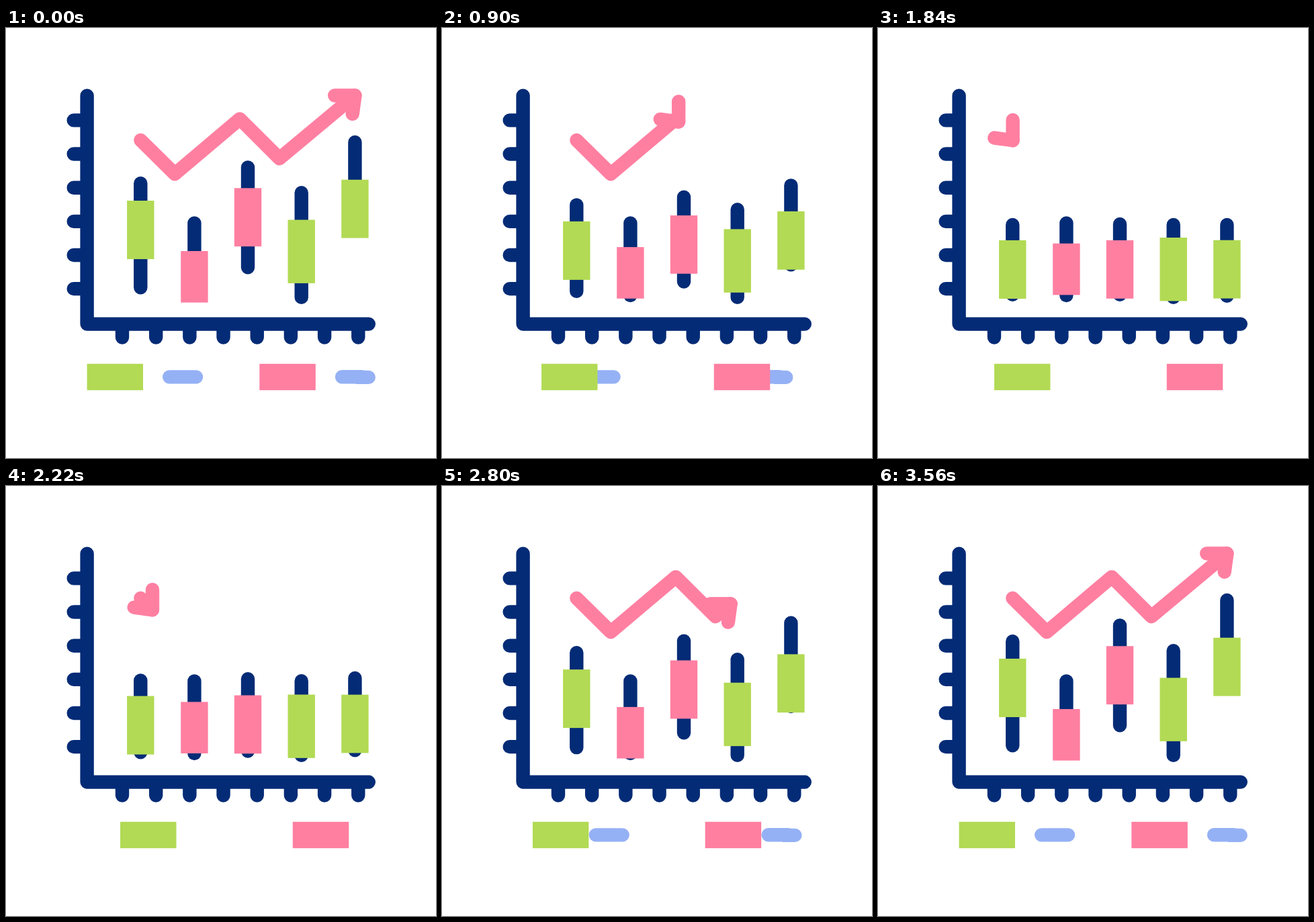
Animation of 640x640 px, one loop 3.6 s. Source, as an HTML page:

```html
<!DOCTYPE html>
<html lang="en">
<head>
<meta charset="utf-8">
<title>Candlestick chart</title>
<style>
  html, body { margin: 0; width: 100%; height: 100%; overflow: hidden; background: #fff; }
  svg { display: block; width: 100vw; height: 100vh; }
</style>
</head>
<body>
<svg id="stage" viewBox="0 0 640 640" fill="none" stroke-width="20.4" stroke-linecap="round" stroke-linejoin="round"></svg>
<script>
const NAVY = '#042b76', PINK = '#ff7fa1', GREEN = '#b2da54', BLUE = '#95b1f5';
const LOOP = 3600, HALF = 1779, SLIDE = 52.5;
const stage = document.getElementById('stage');

function add(tag, attrs, parent = stage) {
  const el = document.createElementNS('http://www.w3.org/2000/svg', tag);
  set(el, attrs);
  parent.append(el);
  return el;
}
function set(el, attrs) {
  for (const k in attrs) el.setAttribute(k, attrs[k]);
}
const stroke = (color, d, parent) => add('path', { d, stroke: color }, parent);
const box = (fill, x, y, width, height, parent) => add('rect', { fill, x, y, width, height }, parent);
const mix = ([a, b], p) => a + (b - a) * p;

// Axes and ticks
let axes = 'M120.6 100.6V440.6H539.8';
for (let i = 0; i < 6; i++) axes += `M100.7 ${137.4 + i * 50.15}h18`;
for (let i = 0; i < 8; i++) axes += `M${173 + i * 50.18} 442V460.6`;
stroke(NAVY, axes);

// Each pair is [expanded, collapsed]; wick values are the centres of its round ends
const candles = [
  { x: 200.3, color: GREEN, h: 87, top: [257, 316], wick: [[231.3, 293], [386.3, 396.8]] },
  { x: 280.4, color: PINK, h: 76.6, top: [332, 320.7], wick: [[290.4, 290.4], [398, 398]] },
  { x: 360, color: PINK, h: 86.8, top: [238.3, 316], wick: [[207.5, 292], [356.3, 396.8]] },
  { x: 439.7, color: GREEN, h: 94.4, top: [285.5, 312], wick: [[245.2, 293], [400.9, 400.9]] },
  { x: 519.4, color: GREEN, h: 86.8, top: [225.8, 315.8], wick: [[170, 293], [301.5, 398.8]] }
];
for (const c of candles) {
  c.line = stroke(NAVY, '');
  c.body = box(c.color, c.x - 20.2, 0, 40.4, c.h);
}

// Legend: swatches slide right while the pills slide left behind them
const pills = add('g', {});
stroke(BLUE, 'M243.2 519.4H283', pills);
stroke(BLUE, 'M500 519.3H530M522 519.9H539.7', pills);
const swatches = add('g', {});
box(GREEN, 120.6, 499.8, 83.4, 39.3, swatches);
box(PINK, 377.3, 499.8, 83.5, 39.3, swatches);

// Trend arrow
const route = [[200.4, 167], [251.2, 217.2], [348, 135.4], [407, 194.2], [519.4, 100.5]];
const dist = (a, b) => Math.hypot(b[0] - a[0], b[1] - a[1]);
const total = route.slice(1).reduce((sum, pt, i) => sum + dist(route[i], pt), 0);
const trend = stroke(PINK, '');
const head = stroke(PINK, 'M-30.2 0H0L-3.7 27.4');

function drawArrow(p) {
  let left = total * (1 - p), i = 0;
  while (i < 3 && left > dist(route[i], route[i + 1])) {
    left -= dist(route[i], route[i + 1]);
    i++;
  }
  const k = left / dist(route[i], route[i + 1]);
  const tip = [0, 1].map(n => mix([route[i][n], route[i + 1][n]], k));
  set(trend, { d: 'M' + [...route.slice(0, i + 1), tip].map(q => q.join(' ')).join('L') });
  // Falling segments turn the head by a quarter
  set(head, { transform: `translate(${tip}) rotate(${i % 2 ? 0 : 90})` });
}

// cubic-bezier(.72, 0, .28, 1)
function ease(x) {
  if (x <= 0) return 0;
  if (x >= 1) return 1;
  let lo = 0, hi = 1;
  for (let i = 0; i < 30; i++) {
    const s = (lo + hi) / 2;
    if (2.16 * s - 3.48 * s * s + 2.32 * s ** 3 < x) lo = s; else hi = s;
  }
  return lo * lo * (3 - 2 * lo);
}

function draw(t) {
  const p = t < HALF ? ease(t / HALF) : 1 - ease((t - HALF) / HALF);
  for (const c of candles) {
    set(c.line, { d: `M${c.x} ${mix(c.wick[0], p)}V${mix(c.wick[1], p)}` });
    set(c.body, { y: mix(c.top, p) });
  }
  set(pills, { transform: `translate(${-SLIDE * p})` });
  set(swatches, { transform: `translate(${SLIDE * p})` });
  drawArrow(p);
}

const start = performance.now();
function tick() {
  draw((performance.now() - start) % LOOP);
  requestAnimationFrame(tick);
}
tick();
</script>
</body>
</html>
```
